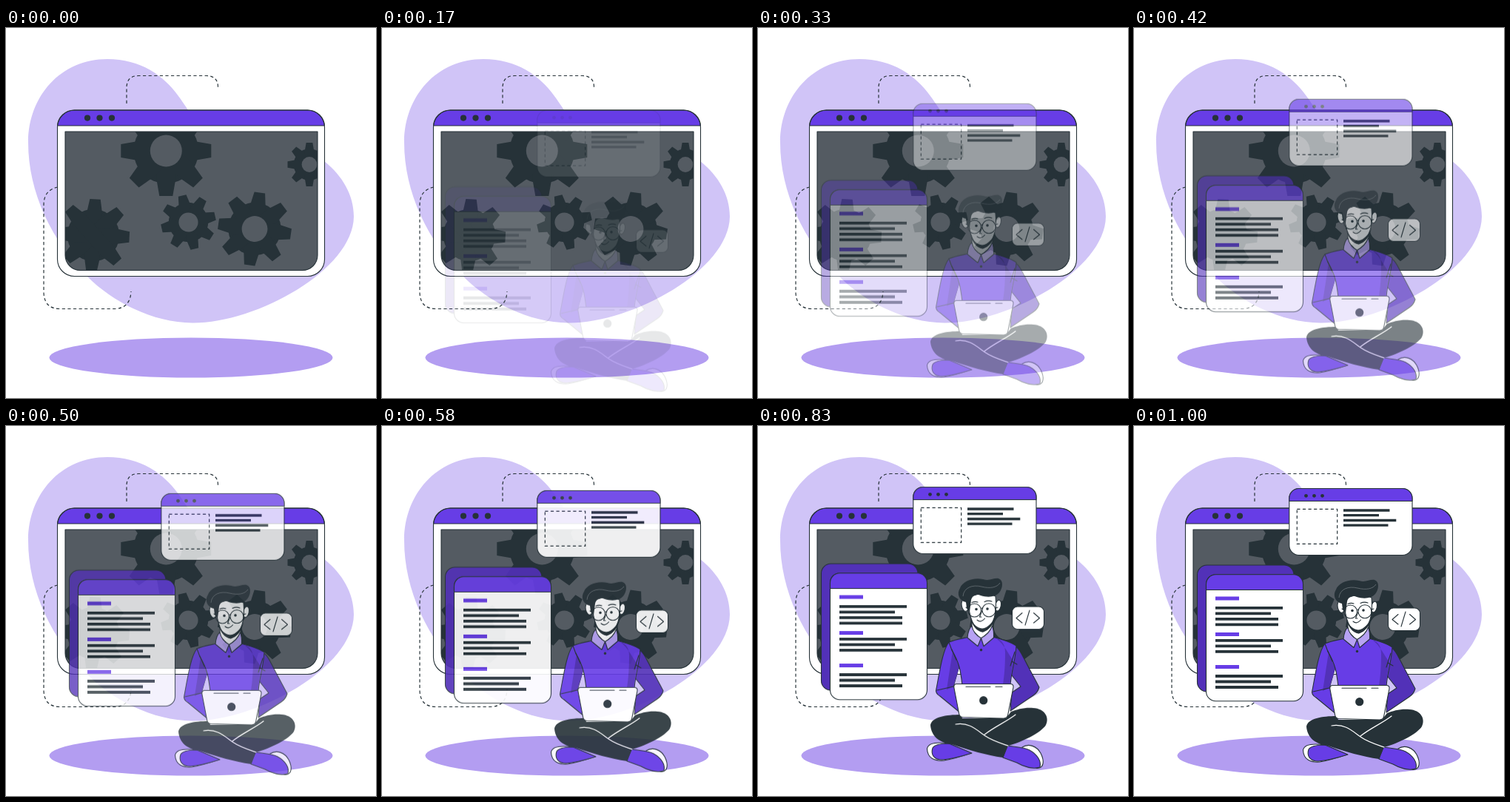
Recreate the animation shown at these times as an HTML page without scripts. Size 500 by 500 pixels, loop 1.04 s.

```html
<!DOCTYPE html>
<html lang="en">
<head>
<meta charset="utf-8">
<title>Developer at work</title>
<style>
  html, body { margin: 0; width: 100%; height: 100%; overflow: hidden; background: #fff; }
  svg { display: block; width: 100%; height: 100%; }
  .ink { fill: #263238; }
  .purple { fill: #673de6; }
  .deep { fill: #5231b8; }
  .pale { fill: #b7a2f3; }
  .white { fill: #fff; }
  .grey { fill: #545b62; }
  .edge { stroke: #263238; stroke-width: 1.1; stroke-linejoin: round; }
  .line { fill: none; stroke: #263238; stroke-width: 1.1; stroke-linecap: round; stroke-linejoin: round; }
  .dash { stroke-dasharray: 4.2 3.4; stroke-width: 1.2; stroke-linecap: butt; }
  .bars { fill: none; stroke: #263238; stroke-width: 3.8; }
  .thin { stroke-width: 3.3; }
  .heads { fill: none; stroke: #673de6; stroke-width: 5.2; }
  .seam { fill: none; stroke: #fff; stroke-width: 1.2; stroke-linecap: round; }

  /* rises with a slight overshoot, then rests until the loop restarts */
  .rise {
    animation: rise 1040ms infinite, show 1040ms step-end infinite;
  }
  @keyframes rise {
    0% {
      opacity: 0;
      transform: translateY(30px);
      animation-timing-function: cubic-bezier(.36, -.01, .5, 1.38);
    }
    93.3%, 100% { opacity: 1; transform: none; }
  }
  @keyframes show {
    0% { visibility: hidden; }
    12.5%, 100% { visibility: visible; }
  }
</style>
</head>
<body>
<svg viewBox="0 0 500 500">
  <defs>
    <path id="bar" d="M-9-61H9L13-38V38L9 61H-9L-13 38V-38Z"/>
    <g id="gear">
      <circle r="44"/>
      <use href="#bar"/>
      <use href="#bar" transform="rotate(45)"/>
      <use href="#bar" transform="rotate(90)"/>
      <use href="#bar" transform="rotate(135)"/>
    </g>
    <g id="wheel">
      <use href="#gear" class="ink"/>
      <circle r="21.5" class="grey"/>
    </g>
    <path id="screen" d="M80 140H421V307A20.500 20.500 0 0 1 400.500 327.500H100.500A20.500 20.500 0 0 1 80 307Z"/>
    <clipPath id="glass"><use href="#screen"/></clipPath>
  </defs>

  <!-- backdrop -->
  <path fill="#d0c4f7" d="M30 155C30 92 74 42 137 42C182 42 213 64 233 92C247 111 258 135 290 143C330 150 392 154 430 180C455 200 470 226 470 255C469 327 338 399 252 398.500C198 398 144 370 110 336C62 288 30 222 30 155Z"/>
  <ellipse cx="250" cy="445.500" rx="191.500" ry="27" fill="#b39df1"/>
  <path class="line dash" d="M163 102V81Q163 64.500 179 64.500H271Q286.500 65 286.500 80"/>
  <path class="line dash" d="M70 215Q51 219 51 239V358Q52 379.500 73 379.500H148Q168 378 169 356"/>

  <!-- main window -->
  <rect class="white" x="69.500" y="111" width="361" height="224.500" rx="23"/>
  <path class="purple edge" d="M69.500 132A23 23 0 0 1 92.500 111H407.500A23 23 0 0 1 430.500 132Z"/>
  <rect class="line" x="69.500" y="111" width="361" height="224.500" rx="23"/>
  <g class="ink">
    <circle cx="110" cy="121.600" r="4.100"/>
    <circle cx="126.500" cy="121.600" r="4.100"/>
    <circle cx="143" cy="121.600" r="4.100"/>
  </g>
  <use href="#screen" class="grey"/>
  <g clip-path="url(#glass)">
    <use href="#wheel" transform="translate(216.300 166)"/>
    <use href="#wheel" transform="translate(410 184.500) scale(.483)"/>
    <use href="#wheel" transform="translate(246.500 262.500) rotate(-13) scale(.607)"/>
    <use href="#wheel" transform="translate(336 271.500) rotate(8) scale(.81)"/>
    <use href="#gear" class="ink" transform="translate(118 280) rotate(3) scale(.8)"/>
  </g>
  <use href="#screen" class="line"/>

  <g class="rise">
    <!-- document -->
    <rect class="deep edge" x="85.500" y="188" width="130.500" height="171" rx="13"/>
    <rect class="white edge" x="97.500" y="200.700" width="131" height="171" rx="13"/>
    <path class="purple edge" d="M97.500 221.500V213.700A13 13 0 0 1 110.500 200.700H215.500A13 13 0 0 1 228.500 213.700V221.500Z"/>
    <path class="heads" d="M110 233H142M110 281.500H142M110 325.500H142"/>
    <path class="bars" d="M110 245.800H201M110 253.300H185M110 260.800H195M110 268.300H195M110 289.800H201M110 297.300H185M110 304.800H195M110 338H201M110 345.500H185M110 353H195"/>

    <!-- card -->
    <rect class="white edge" x="209.800" y="84.500" width="166.200" height="90" rx="13"/>
    <path class="purple edge" d="M209.800 101.500V97.500A13 13 0 0 1 222.800 84.500H363A13 13 0 0 1 376 97.500V101.500Z"/>
    <g class="ink">
      <circle cx="232.500" cy="94.300" r="2.400"/>
      <circle cx="243.500" cy="94.300" r="2.400"/>
      <circle cx="254.500" cy="94.300" r="2.400"/>
    </g>
    <rect class="line dash" x="220.300" y="112.400" width="54.400" height="47"/>
    <path class="bars thin" d="M283 114H345.500M283 120.700H331M283 127.500H354.300M283 134.200H343.500"/>

    <!-- code tag -->
    <rect class="white edge" x="343.500" y="246" width="43" height="30.500" rx="7"/>
    <path class="line" d="M357 254.500L349 261.500L357 268M367 251L361 271M372.500 254.500L380.500 261.500L372.500 268"/>

    <!-- arms and torso -->
    <path class="purple edge" d="M258 294C250 304 246 330 241 357Q239 363 246 367L274 390L277 362L264 354L276 312Z"/>
    <path class="deep" d="M263 306L272 328L264 354L255 358Z"/>
    <path class="line" d="M242 359L264 354"/>
    <path class="deep edge" d="M340 296C352 299 355 308 360 317C368 333 375 345 380 355Q378 362 372 366L341 387L343 362L355 354L336 330Z"/>
    <path class="purple edge" d="M258 294C268 290 277 289 285 287L302 288L317 287C329 290 341 293 349 299C348 318 342 335 341 352H276C274 334 272 321 262 305Z"/>
    <path class="deep" d="M322 289C330 291 334 298 334 308C334 325 333 338 331 351H340.500C341 338 344 328 345 319C338 310 333 297 322 289Z"/>
    <path class="line" d="M262 304L268 318M347 307L341 326M343 320L350 324"/>

    <!-- head -->
    <path class="white edge" d="M289 264V277L301.500 290L317 276V262Z"/>
    <path class="pale edge" d="M289 272Q284 276 283 288L297 299.500L301.500 288.500Q291 283 289 272Z"/>
    <path class="pale edge" d="M316.500 272Q319 278 318.500 288L305 299.500L301.500 288.500Q313 282 316.500 272Z"/>
    <circle class="ink" cx="301.500" cy="304.500" r="1.700"/>
    <ellipse class="white edge" cx="279.500" cy="244.500" rx="4.300" ry="8" transform="rotate(-12 279.500 244.500)"/>
    <ellipse class="white edge" cx="324.500" cy="244.500" rx="3.800" ry="7.500" transform="rotate(12 324.500 244.500)"/>
    <path class="white edge" d="M284 236C294 226 312 228 321 232C323 252 320 273 304 280C292 277 285 262 284 236Z"/>
    <path class="ink" d="M287 262C290 273 296 279 303 280.500C312 279 320 269 321 258C318 266 311 275 303 275.500C296 275 291 270 287 262Z"/>
    <path class="ink" d="M281 240C272 238 268 229 273 221C276 212 291 206 304 209C313 212 318 207 325 208C332 210 331 221 326 227C321 233 311 234 301 231C294 228 290 231 288 237L286 253L282 248Z"/>
    <path fill="none" stroke="#6d757a" stroke-width=".8" d="M277 232C278 220 290 216 302 219C314 222 323 220 327 214"/>
    <circle class="line" cx="292.500" cy="251" r="9"/>
    <circle class="line" cx="312" cy="250.800" r="9"/>
    <path class="line" d="M301.500 249Q302.500 247 303.500 249M284 249L281 247M321 248L324 247M289 240.500Q293 238.500 297 240M306 239.500Q311 237 316 239M302.500 252L299.500 260H302M296 264Q301 268.500 306.500 262"/>
    <circle class="ink" cx="295" cy="249.500" r="1.800"/>
    <circle class="ink" cx="310" cy="249" r="1.800"/>

    <!-- shoes and legs -->
    <path class="white edge" d="M258 431C243 429 230 430 228.500 438C229 451 239 455 251 454C264 452 276 448 288 444Z"/>
    <path class="purple edge" d="M258 431C249 431 239 432 236 437C233 446 238 453 249 453C262 452 276 448 289 444Z"/>
    <path class="white edge" d="M357 436C366 430 377 435 382 444C387 454 387 464 377 464.500L360 458Z"/>
    <path class="purple edge" d="M337 434C350 436 359 436 367 440C378 446 383 455 381 463C372 466 360 463 350 457L331 450Z"/>
    <path class="ink" d="M274 392C254 392 235 395 233 406C234 421 245 430 262 432C286 440 309 447 331 450L338 434C357 429 383 416 389 406C394 396 388 384 372 383C360 382 350 385 342 388L335 397H276Z"/>
    <path class="seam" d="M267 405C285 402 295 412 306 420C316 427 326 430 338 434M348 392C335 402 320 408 306 419"/>

    <!-- laptop -->
    <path class="white edge" d="M268.500 350.500H341Q345.500 350.500 345 355L337.500 393Q336.500 397 332 397L277 395.500Q272.500 395 271.700 391L264.800 355Q264.500 350.500 268.500 350.500Z"/>
    <path class="line" d="M281 354.300H314M321 354.300H330"/>
    <circle class="ink" cx="304.700" cy="372.700" r="5.600"/>
  </g>
</svg>
</body>
</html>
```
